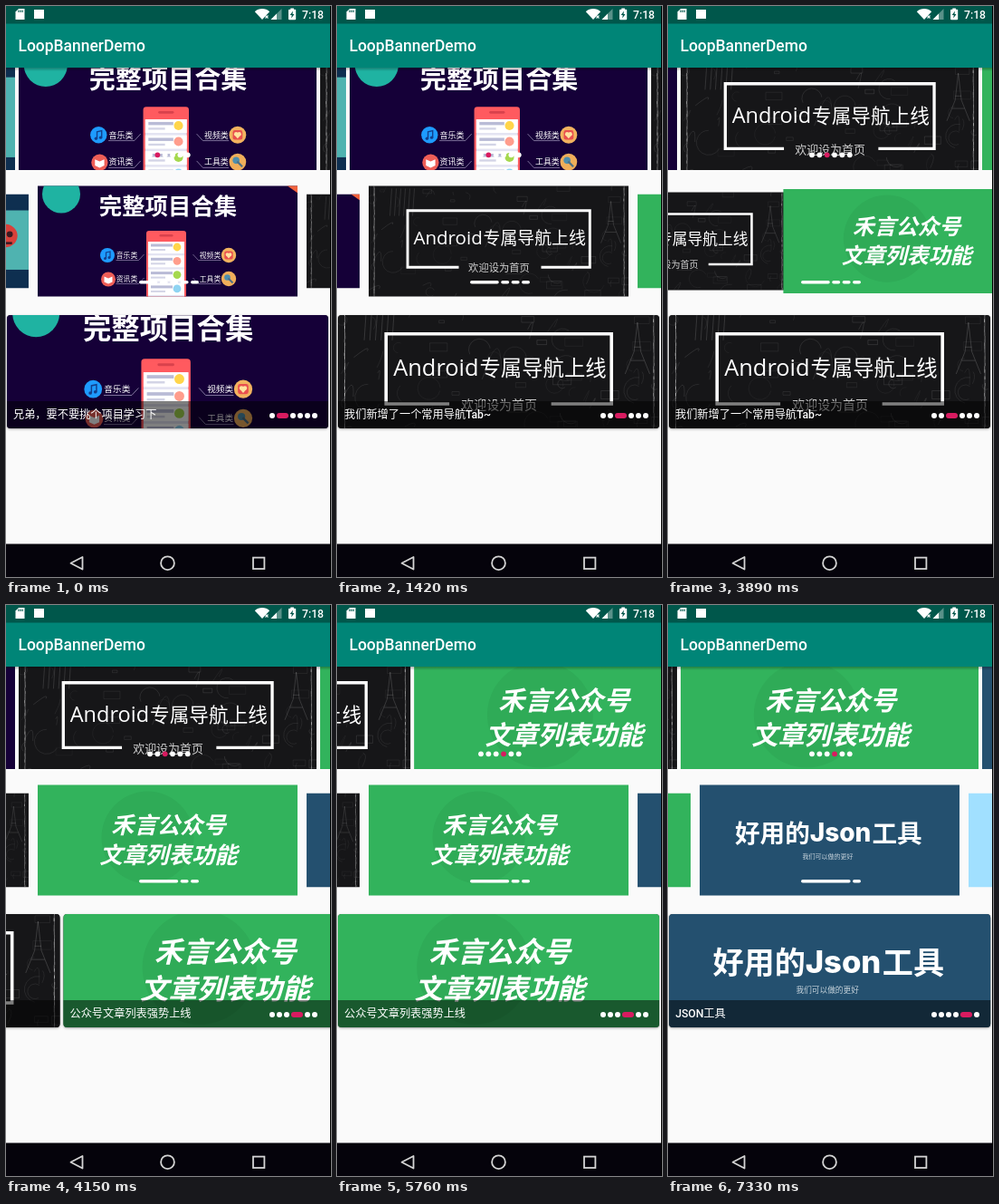
An HTML page with a canvas for the animation above (8000 ms loop, 359 by 630 pixels).

```html
<!DOCTYPE html>
<html lang="zh-CN">
<head>
<meta charset="utf-8">
<title>LoopBannerDemo</title>
<style>
html, body { margin: 0; width: 100%; height: 100%; overflow: hidden; background: #fafafa; }
canvas { display: block; width: 359px; height: 630px; }
</style>
</head>
<body>
<canvas id="stage"></canvas>
<script>
const W = 359, H = 630, LOOP = 8000, CX = 178.5;
const ACCENT = '#d81b60';
const CJK = '"Noto Sans CJK SC", "Noto Sans CJK", sans-serif';
const UI = 'Roboto, "Noto Sans CJK SC", "Noto Sans CJK", sans-serif';

const canvas = document.getElementById('stage');
const ratio = window.devicePixelRatio || 1;
canvas.width = W * ratio;
canvas.height = H * ratio;
const g = canvas.getContext('2d');

// The screen refreshes only at these moments.
const STEPS = [0, 1000, 1120, 1270, 1420, 1830, 1970, 3890, 4030, 4150,
  4300, 5760, 5910, 6910, 7060, 7180, 7330];
const SCROLL = 305;
const STARTS = { top: [1679, 5679], mid: [830, 3830, 6830], card: [1140, 4060, 7090] };
const CAPTIONS = ['', '兄弟，要不要挑个项目学习下', '我们新增了一个常用导航Tab~',
  '公众号文章列表强势上线', 'JSON工具', ''];

function pagePos(starts, t) {
  return starts.reduce((pos, s) => {
    const u = Math.min(1, Math.max(0, (t - s) / SCROLL));
    return pos + 1 - (1 - u) ** 5;
  }, 1);
}

function rect(x, y, w, h, color) {
  g.fillStyle = color;
  g.fillRect(x, y, w, h);
}

function round(x, y, w, h, r, color) {
  g.fillStyle = color;
  g.beginPath();
  g.roundRect(x, y, w, h, r);
  g.fill();
}

function dot(x, y, r, color) {
  g.fillStyle = color;
  g.beginPath();
  g.arc(x, y, r, 0, 7);
  g.fill();
}

function path(points, close) {
  g.beginPath();
  points.forEach(([x, y]) => g.lineTo(x, y));
  if (close) g.closePath();
}

function poly(points, color) {
  path(points, true);
  g.fillStyle = color;
  g.fill();
}

function line(points, color, width, close) {
  path(points, close);
  g.strokeStyle = color;
  g.lineWidth = width;
  g.stroke();
}

function text(str, x, y, font, color, align = 'center', base = 'middle') {
  g.font = font;
  g.fillStyle = color;
  g.textAlign = align;
  g.textBaseline = base;
  g.fillText(str, x, y);
}

function seeded(seed) {
  return () => (seed = (seed * 16807) % 2147483647) / 2147483647;
}

// Artwork is drawn around (0, 0) on a picture 287 units wide.
function fill(color) {
  rect(-144, -75, 288, 150, color);
}

function artMask() {
  fill('#0e2f50');
  rect(-144, -40, 288, 77, '#4fb3b0');
  g.fillStyle = '#d8403a';
  g.beginPath();
  g.ellipse(113, -7, 16, 15, 0, 0, 7);
  g.fill();
  dot(119, -9, 4, '#3a1a22');
  rect(108, 1, 14, 3, '#3a1a22');
}

function artProjects() {
  fill('#150038');
  dot(-117.5, -52, 21, '#1fb3a2');
  poly([[131, -62], [144, -62], [144, -53]], '#f0623c');
  text('完整项目合集', 0.5, -39, '900 25.4px ' + CJK, '#fff');

  round(-23.5, -11.5, 44, 90, 3, '#ff5a5f');
  round(-9, -7.5, 15, 2.4, 1.2, '#d9414c');
  rect(-21.5, 0.5, 40, 75, '#e4e4f2');
  ['#ffd54a', '#ff9d8c', '#a5d94e', '#8fd4f2'].forEach((color, i) => {
    const y = 0.5 + i * 15.3;
    rect(-21.5, y, 40, 13, '#fff');
    rect(-18.5, y + 2.5, 24, 3, '#b9bbd6');
    rect(-18.5, y + 8, 16, 2, '#d3d4e6');
    dot(10.5, y + 6, 4.4, color);
  });

  const font = '500 7.8px ' + CJK;
  [['音乐类', -1, 15.5], ['资讯类', -1, 41.5], ['视频类', 1, 15.5], ['工具类', 1, 41.5]].forEach(([name, side, y]) => {
    const x = side < 0 ? -45 : 47;
    text(name, x, y, font, '#fff');
    line([[x + side * 12, y + 5.5], [x - side * 13, y + 5.5], [x - side * 19, y - 1]], '#a9a0c2', 0.6);
  });

  dot(-66.5, 15.5, 8, '#1e9bff');
  line([[-68, 19], [-68, 12.5], [-63.5, 11.5], [-63.5, 18]], '#123f8c', 1.2);
  dot(-69, 19, 1.5, '#123f8c');
  dot(-64.5, 18, 1.5, '#123f8c');

  dot(-65.5, 42, 8, '#ee5e57');
  poly([[-70, 39], [-65.5, 41], [-61, 39], [-61, 45], [-65.5, 47], [-70, 45]], '#fff');

  dot(67.5, 15.5, 8.2, '#f2b35f');
  round(62.8, 11, 9.4, 9, 2, '#e94f4f');
  dot(66, 14.6, 1.9, '#ffe3a0');
  dot(69, 14.6, 1.9, '#ffe3a0');
  poly([[64.2, 15.2], [70.8, 15.2], [67.5, 19]], '#ffe3a0');

  dot(67.5, 41.5, 8.2, '#efae5a');
  dot(66, 40, 3.3, '#4d8fae');
  line([[67, 41], [72, 46]], '#4d6f86', 2);
}

function artChalk() {
  fill('#161618');
  const rnd = seeded(77);
  const ink = () => `rgba(205,205,205,${0.05 + rnd() * 0.11})`;
  for (let i = 0; i < 80; i++) {
    const x = -140 + rnd() * 280, y = -62 + rnd() * 124, r = 3 + rnd() * 9;
    g.strokeStyle = ink();
    g.lineWidth = 0.7;
    g.beginPath();
    if (i % 3 === 0) g.arc(x, y, r, rnd() * 3, 3 + rnd() * 4);
    else if (i % 3 === 1) g.rect(x, y, r * 1.5, r * 0.7);
    else {
      g.moveTo(x, y);
      g.quadraticCurveTo(x + r, y - r * 2, x + rnd() * 30 - 15, y + rnd() * 30 - 15);
    }
    g.stroke();
  }
  const faint = 'rgba(210,210,210,.2)';
  line([[113, 2], [121, -18], [124, -44], [127, -18], [135, 2]], faint, 0.8);
  line([[118, -10], [130, -10]], faint, 0.8);
  line([[121, -22], [127, -22]], faint, 0.8);
  for (let i = 0; i < 6; i++) line([[-118 + i * 5, -58], [-120 + i * 5, -28]], faint, 0.7);
  for (const x of [-138, 138]) {
    for (let y = -62; y < 62; y += 3) rect(x + rnd() * 0.4, y, 0.8, 3, `rgba(215,215,215,${0.35 + rnd() * 0.5})`);
  }

  line([[-44, 28.7], [-100.5, 28.7], [-100.5, -33.8], [100.8, -33.8], [100.8, 28.7], [47, 28.7]], '#fff', 2.9);
  text('Android', -94, 3.6, '400 20.5px "Open Sans", sans-serif', '#fff', 'left', 'alphabetic');
  text('专属导航上线', -17, -3.4, '400 18.9px ' + CJK, '#fff', 'left');
  text('欢迎设为首页', 0.5, 29, '400 11.3px ' + CJK, '#cfcfcf');
}

function artArticles() {
  fill('#32b35c');
  dot(-22, -3, 51, '#2fab57');
  text('禾言公众号', 1, -17.5, 'italic 900 25.4px ' + CJK, '#fff');
  text('文章列表功能', 1, 16.2, 'italic 900 25.4px ' + CJK, '#fff');
}

function artJson() {
  fill('#24506f');
  const font = '900 27.6px ' + CJK;
  text('好用的', -104.5, -7.5, font, '#fff', 'left');
  text('Json', 12, -6.5, '800 28px Inter, sans-serif', '#fff');
  text('工具', 47, -7.5, font, '#fff', 'left');
  text('我们可以做的更好', -2, 17.5, '400 7px ' + CJK, '#c9d5dd');
}

const ART = [artMask, artProjects, artChalk, artArticles, artJson, () => fill('#a1e0ff')];

// Draws one picture, centre-cropped to w by h.
function picture(i, cx, cy, w, h, radius = 0) {
  g.save();
  g.beginPath();
  g.roundRect(cx - w / 2, cy - h / 2, w, h, radius);
  g.clip();
  g.translate(cx, cy);
  g.scale(w / 287, w / 287);
  ART[i]();
  g.restore();
}

function pages(pos, top, height, draw) {
  g.save();
  g.beginPath();
  g.rect(0, top, W, height);
  g.clip();
  const first = Math.max(0, Math.floor(pos) - 1);
  for (let i = first; i < Math.min(ART.length, first + 4); i++) draw(i, i - pos);
  g.restore();
}

const selected = pos => Math.ceil(pos - 1e-6);

function topBanner(t) {
  const pos = pagePos(STARTS.top, t);
  pages(pos, 68, 113, (i, d) => picture(i, CX + d * 333, 124.5, 329, 113));
  for (let i = 0; i < 6; i++) dot(159 + i * 8.35, 164.3, 2.9, i === selected(pos) ? ACCENT : '#fff');
}

function midBanner(t) {
  const pos = pagePos(STARTS.mid, t);
  pages(pos, 198, 123.5, (i, d) => {
    const a = Math.abs(d), s = Math.max(0.85, 1 - 0.17 * a);
    const shift = Math.sign(d) * (240 * a + 35.5 * a * a);
    picture(i, CX + shift, 259.5, 287 * s, 122 * s);
  });
  const done = Math.floor(pos + 0.01);
  round(147, 303, 9 + done * 11.4, 3.6, 1.8, '#fff');
  for (let i = done + 1; i < 6; i++) round(147 + i * 11.4, 303, 9, 3.6, 1.8, '#fff');
}

function cardBanner(t) {
  const pos = pagePos(STARTS.card, t);
  pages(pos, 338, 132, (i, d) => {
    const x = 1 + d * 359;
    g.save();
    g.shadowColor = 'rgba(0,0,0,.35)';
    g.shadowBlur = 2.5 * ratio;
    g.shadowOffsetY = ratio;
    round(x, 341, 355, 125, 4, '#333');
    g.restore();
    picture(i, x + 177.5, 403.5, 355, 125, 4);
    round(x, 436, 355, 30, [0, 0, 4, 4], 'rgba(0,0,0,.5)');
    text(CAPTIONS[i], x + 7, 451, '500 12.2px ' + UI, '#fff', 'left');
  });
  let x = 291;
  for (let i = 0; i < 6; i++) {
    const on = i === selected(pos), w = on ? 13 : 6;
    round(x, 449, w, 6, 3, on ? ACCENT : '#fff');
    x += w + 2;
  }
}

function statusBar() {
  rect(0, 0, W, 19.5, '#00574b');
  poly([[14, 3], [20.5, 3], [20.5, 15], [10.5, 15], [10.5, 6.5]], '#fff');
  for (let i = 0; i < 3; i++) rect(13.4 + i * 2.1, 4.5, 1.1, 2.5, '#00574b');
  rect(31, 4, 11, 10, '#fff');

  g.fillStyle = '#fff';
  g.beginPath();
  g.moveTo(283, 15);
  g.arc(283, 15, 12, -Math.PI * 0.74, -Math.PI * 0.26);
  g.fill();
  line([[286.5, 10.5], [289.5, 13.5]], '#fff', 1.1);
  line([[289.5, 10.5], [286.5, 13.5]], '#fff', 1.1);
  poly([[304.5, 3], [304.5, 15], [292.5, 15]], 'rgba(255,255,255,.35)');
  poly([[299, 8.5], [299, 15], [292.5, 15]], '#fff');

  rect(314.3, 2.5, 3.6, 2, '#fff');
  round(312, 3.8, 8.2, 11.4, 1, '#fff');
  poly([[317, 5.5], [313.7, 10], [315.7, 10], [315.2, 13.5], [318.5, 9], [316.5, 9]], '#00574b');
  text('7:18', 351, 13.6, '500 12.2px ' + UI, '#fff', 'right', 'alphabetic');
}

function chrome() {
  const shade = g.createLinearGradient(0, 68, 0, 72);
  shade.addColorStop(0, 'rgba(0,0,0,.28)');
  shade.addColorStop(1, 'rgba(0,0,0,0)');
  rect(0, 68, W, 4, shade);
  rect(0, 19, W, 49, '#008577');
  statusBar();
  text('LoopBannerDemo', 13.5, 50.3, '500 17.45px ' + UI, '#fff', 'left', 'alphabetic');

  rect(0, 593.5, W, 36.5, '#05030b');
  g.lineJoin = 'round';
  line([[84.5, 608], [84.5, 621.5], [71.5, 614.8]], '#d4d4d4', 1.8, true);
  g.lineJoin = 'miter';
  g.beginPath();
  g.arc(178.5, 614.7, 7.4, 0, 7);
  g.stroke();
  g.strokeRect(273, 608.6, 12.4, 12.4);
  rect(358, 0, 1, H, '#000');
}

function draw(t) {
  g.setTransform(ratio, 0, 0, ratio, 0, 0);
  rect(0, 0, W, H, '#fafafa');
  topBanner(t);
  midBanner(t);
  cardBanner(t);
  chrome();
}

const origin = performance.now();
function tick() {
  const t = (performance.now() - origin) % LOOP;
  draw(STEPS.filter(s => s <= t).pop() || 0);
  requestAnimationFrame(tick);
}
tick();
</script>
</body>
</html>
```
